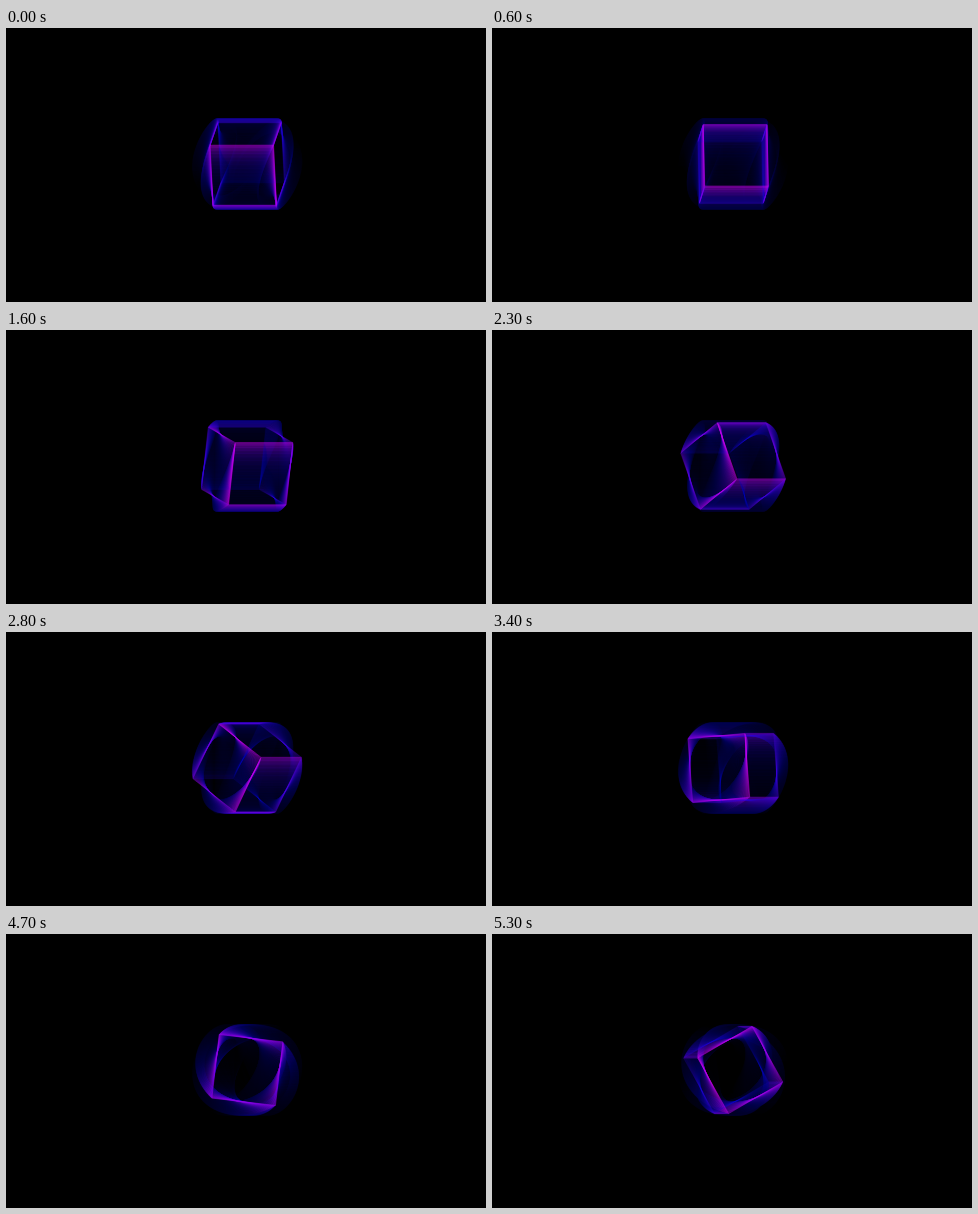
Animation, 480 px wide and 274 px high, one loop 5.4 s. Source, as an HTML page with a canvas:

```html
<!DOCTYPE html>
<html lang="en">
<head>
<meta charset="utf-8">
<title>Spinning cube with light trails</title>
<style>
  html, body { margin: 0; width: 100%; height: 100%; overflow: hidden; background: #000; }
  canvas { display: block; }
</style>
</head>
<body>
<canvas id="stage" width="480" height="274"></canvas>
<script>
const ctx = document.getElementById('stage').getContext('2d');
const LOOP = 5400, STEP = 100;
const CENTER = { x: 241.2, y: 136 }, HALF = 32;
const TRAIL = 2.8, TRAIL_STEP = 1 / 60;
const rad = degrees => degrees * Math.PI / 180;

// Corners are numbered by bits; an edge joins two corners that differ in one bit.
const corners = Array.from({ length: 8 }, (_, i) =>
  [i & 1, i >> 1 & 1, i >> 2 & 1].map(bit => bit ? HALF : -HALF));
const edges = [];
for (let i = 0; i < 8; i++) {
  for (const bit of [1, 2, 4]) if (!(i & bit)) edges.push([i, i | bit]);
}

// The cube rolls about its own axis while that axis turns about the vertical.
function project(time) {
  const roll = rad(20.5 - 60.4 * time), turn = rad(-7.5 + 20.8 * time);
  const cr = Math.cos(roll), sr = Math.sin(roll);
  const ct = Math.cos(turn), st = Math.sin(turn);
  return corners.map(([x, y, z]) => {
    const depth = z * cr - y * sr;
    return {
      x: CENTER.x + x * ct + depth * st,
      y: CENTER.y + y * cr + z * sr,
      z: depth * ct - x * st
    };
  });
}

// Translucent strokes build up to magenta where an edge lingers; old ones cool to blue.
function edgeColor(z, age) {
  const near = Math.min(1, Math.max(0, (z / HALF + 1.4) / 2.6));
  const red = 215 * near * Math.exp(-age / 0.2);
  const glow = 0.6 * Math.exp(-age / 0.35) + 0.4 * Math.exp(-age / 1.3);
  const blue = 245 * glow * Math.min(1, (TRAIL - age) / 0.8);
  const alpha = 0.07 + 0.38 * near;
  return `rgba(${Math.round(red)},0,${Math.round(blue)},${alpha.toFixed(3)})`;
}

function drawCube(time, age) {
  const points = project(time - age);
  for (const [i, j] of edges) {
    const a = points[i], b = points[j];
    ctx.strokeStyle = edgeColor((a.z + b.z) / 2, age);
    ctx.beginPath();
    ctx.moveTo(a.x, a.y);
    ctx.lineTo(b.x, b.y);
    ctx.stroke();
  }
}

function render(time) {
  ctx.fillStyle = '#000';
  ctx.fillRect(0, 0, 480, 274);
  for (let n = Math.floor(TRAIL / TRAIL_STEP); n >= 0; n--) drawCube(time, n * TRAIL_STEP);
}

let shown = -1;
const start = performance.now();
function tick() {
  const elapsed = Math.max(0, performance.now() - start) % LOOP;
  const step = Math.floor(elapsed / STEP);
  if (step !== shown) {
    shown = step;
    render(step * STEP / 1000);
  }
  requestAnimationFrame(tick);
}
tick();
</script>
</body>
</html>
```
